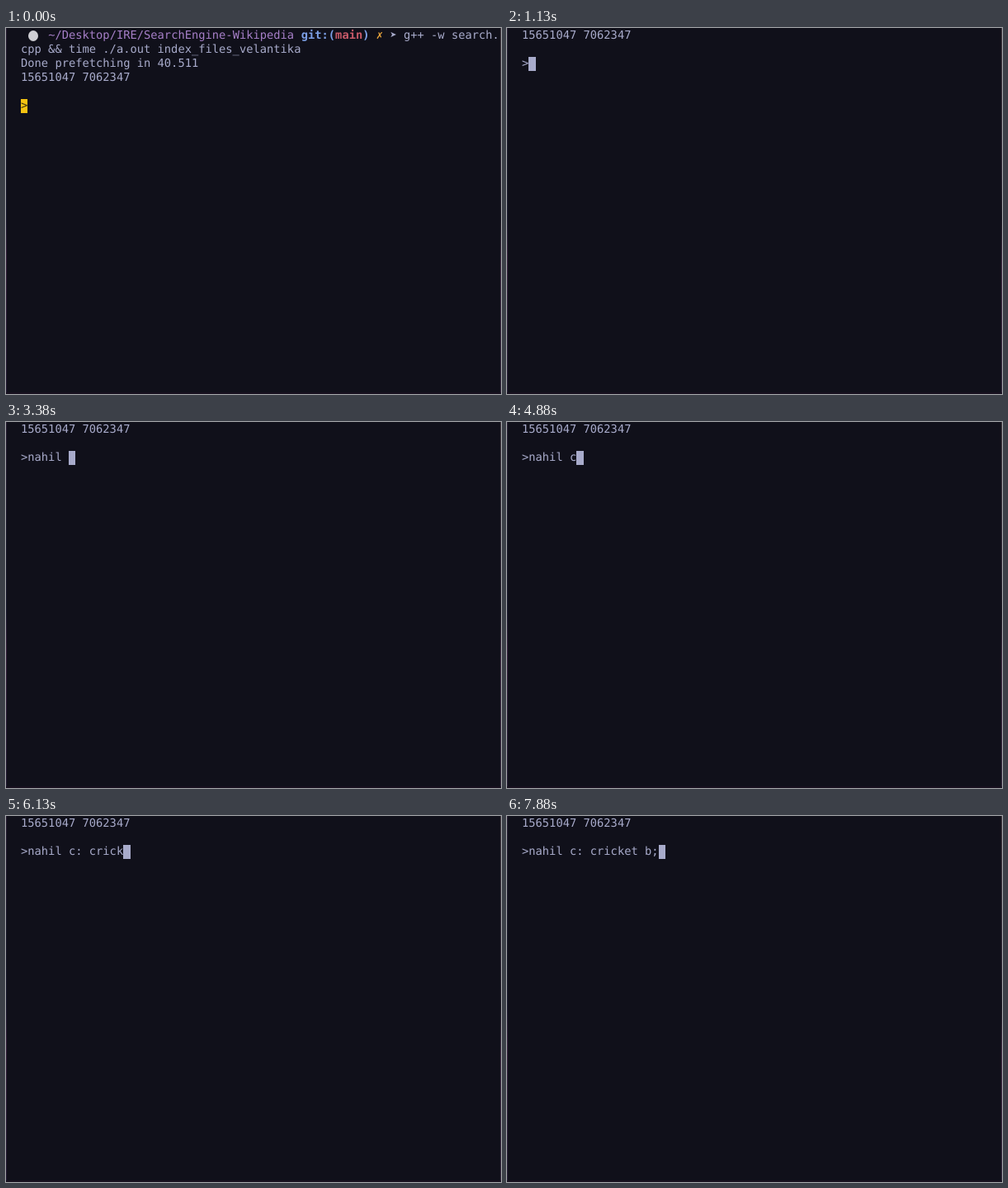
Write an HTML page that moves like this. It is 600 px wide and 443 px high and loops after 8 s.

```html
<!DOCTYPE html>
<html lang="en">
<head>
<meta charset="utf-8">
<title>Terminal search</title>
<style>
html, body { margin: 0; width: 100%; height: 100%; overflow: hidden; background: #10101a; }
body { position: relative; color: #a8abcb; font: 13.76px/17.1px "DejaVu Sans Mono", monospace; text-rendering: geometricPrecision; }
div, span { position: absolute; white-space: pre; }
.screen { inset: 0; }
.block { width: 8.3px; height: 17.1px; }
.logo { left: 27px; top: 3px; width: 12px; height: 13px; border-radius: 50%; background: #cfcfd4; }
.left { left: 0; top: 0; width: 1px; height: 100%; background: linear-gradient(#2a2036, #17172a 40%, #1b1a30 52%, #38223f 62%, #241c36); }
.right { right: 0; top: 0; width: 1px; height: 100%; background: linear-gradient(#3a3038, #241c2c 40%, #120f1a 52%, #38223c 65%, #2a1e34); }
.bottom { left: 0; bottom: 0; width: 100%; height: 2px; background: #17101f; }
</style>
</head>
<body>
<div class="screen" id="before"><div class="logo"></div></div>
<div class="screen" id="after"></div>
<div class="left"></div><div class="right"></div><div class="bottom"></div>
<script>
const LOOP = 8000, SCROLL_AT = 1000;
const CELL = 8.285, ROW = 17.1, LEFT = 18, TOP = 0.7;
const QUERY = "nahil c: cricket b; ";

// [time, number of query characters shown from then on]
const TYPING = [
  [0, 0], [2130, 1], [2250, 2], [2630, 3], [3000, 4], [3130, 5], [3250, 6],
  [4880, 7], [5130, 8], [5250, 9], [5500, 10], [5630, 11], [5880, 12],
  [6130, 14], [6380, 15], [6630, 16], [6750, 17], [7000, 18], [7250, 19],
  [7380, 20], [7880, 19]
];

const before = document.getElementById("before");
const after = document.getElementById("after");

function put(screen, col, row, text, color = "", weight = "") {
  const el = document.createElement("span");
  el.textContent = text;
  el.style.cssText = `left:${LEFT + col * CELL}px; top:${TOP + row * ROW}px; color:${color}; font-weight:${weight}`;
  screen.append(el);
  return el;
}

function cursor(screen, col, row, text, background) {
  const el = put(screen, col, row, text, "#3a300c");
  el.className = "block";
  el.style.background = background;
  return el;
}

put(before, 4, 0, "~/Desktop/IRE/SearchEngine-Wikipedia", "#a67fc8");
put(before, 41, 0, "git:(", "#7c9fe6", "bold");
put(before, 46, 0, "main", "#c95a69", "bold");
put(before, 50, 0, ")", "#7c9fe6", "bold");
put(before, 52, 0, "✗", "#e9a53c", "bold");
put(before, 54, 0, "➤");
put(before, 56, 0, "g++ -w search.");
put(before, 0, 1, "cpp && time ./a.out index_files_velantika");
put(before, 0, 2, "Done prefetching in 40.511");
put(before, 0, 3, "15651047 7062347");
cursor(before, 0, 5, ">", "#f6c311");

put(after, 0, 0, "15651047 7062347");
const prompt = put(after, 0, 2, ">");
const caret = cursor(after, 1, 2, "", "#a8abcb");

function draw(now) {
  const t = now % LOOP;
  const scrolled = t >= SCROLL_AT;
  before.style.display = scrolled ? "none" : "";
  after.style.display = scrolled ? "" : "none";
  const count = TYPING.findLast(([at]) => at <= t)[1];
  prompt.textContent = ">" + QUERY.slice(0, count);
  caret.style.left = LEFT + (count + 1) * CELL + "px";
}

let start;
function tick(now) {
  start ??= now;
  draw(now - start);
  requestAnimationFrame(tick);
}
draw(0);
requestAnimationFrame(tick);
</script>
</body>
</html>
```
